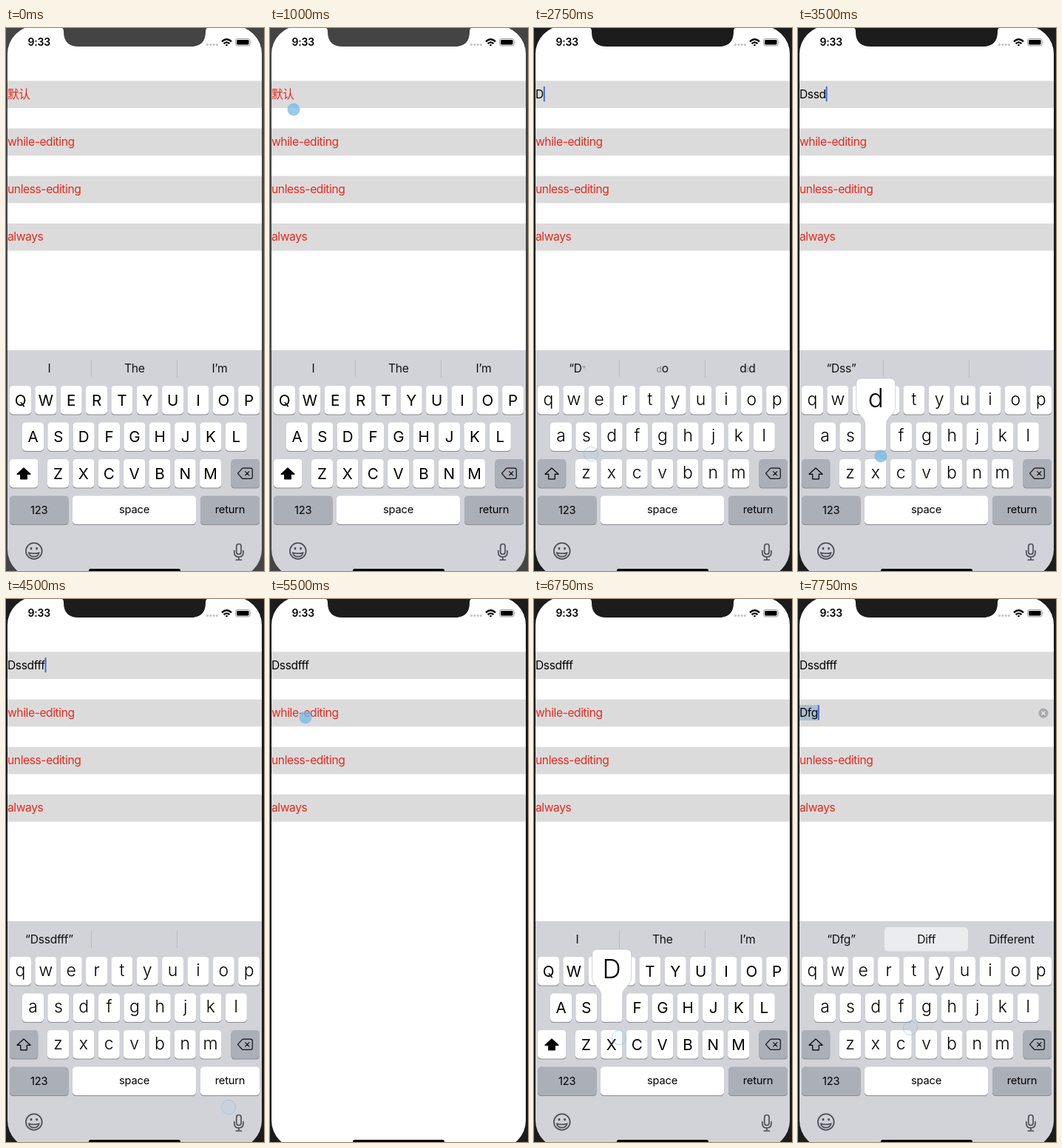
An HTML page that plays this animation: 349x733 px, repeating every 8 s.

```html
<!DOCTYPE html>
<html lang="en">
<head>
<meta charset="utf-8">
<title>Text field clear button modes</title>
<style>
html, body { margin: 0; width: 100%; height: 100%; overflow: hidden; background: #fff; }
svg { display: block; }
text { font-family: Inter, "Noto Sans CJK SC", "Noto Sans CJK", sans-serif; font-size: 15.6px; fill: #000; }
.mid { text-anchor: middle; }
.field { letter-spacing: -.4px; }
.hint { fill: #e8291c; }
.pred { letter-spacing: -.25px; fill: #111; }
.faint { font-size: 12px; fill: #85878c; }
.upper { font-size: 20.6px; }
.lower { font-size: 23px; font-weight: 300; }
.big { font-size: 35px; font-weight: 300; }
.label { font-size: 14.7px; letter-spacing: -.2px; }
.clock { font-size: 14px; font-weight: 600; letter-spacing: -.2px; }
.line { fill: none; stroke: #4d4f57; stroke-width: 1.7; stroke-linecap: round; stroke-linejoin: round; }
</style>
</head>
<body>
<svg width="349" height="733" viewBox="0 0 349 733">
  <rect width="349" height="733" fill="#fff"/>
  <text id="ruler" class="field" visibility="hidden"></text>
  <g id="fields"></g>
  <g id="board"></g>
  <g id="touch"></g>
  <rect x="112" y="730" width="124" height="5" rx="2.5"/>
  <path id="frame" fill-rule="evenodd" d="M0 0H349V733H0Z
    M2 35V704A38 38 0 0 0 40 742H308A38 38 0 0 0 346 704V35A38 38 0 0 0 308 -3H40A38 38 0 0 0 2 35Z"/>
  <path id="notch" d="M74 -1Q78 0 78 4V5Q78 25 98 25H250Q270 25 270 5V4Q270 0 274 -1Z"/>
  <text class="clock" x="29.5" y="24">9:33</text>
  <g id="dots" fill="#c2c2c5"></g>
  <g fill="none" stroke="#000" stroke-width="2.3">
    <path d="M292 18.4Q298.5 12.2 305 18.4M294.6 21.2Q298.5 17.6 302.4 21.2"/>
    <path d="M296.6 22.8Q298.5 21 300.4 22.8L298.5 24.6Z" fill="#000" stroke="none"/>
  </g>
  <rect x="310.5" y="14.5" width="19.5" height="9.4" rx="2.6" fill="none" stroke="#98989b"/>
  <rect x="312" y="16" width="16.5" height="6.4" rx="1.3"/>
  <path d="M331.2 17.5Q333 19.2 331.2 21Z" fill="#98989b"/>
</svg>
<script>
const STEP = 250, LOOP = 8000, PITCH = 34.35;
const ROWS = [["qwertyuiop", 5, 483], ["asdfghjkl", 22, 532.5], ["zxcvbnm", 56, 582]];
const HINTS = ["默认", "while-editing", "unless-editing", "always"];
const IDLE = ["I", "The", "I’m"];
const $ = id => document.getElementById(id);

// Each row changes the state from its time on; touch, pop and ret last one row.
// touch: x, y, pressed. A "~" marks a letter that is still fading.
const SCRIPT = [
  [0, { frame: "#444", caps: 1, drop: 0, focus: 0, caret: 0, one: "", two: "", pred: IDLE, mark: 0 }],
  [250, { caret: 1 }],
  [500, { touch: [32, 110, 0] }],
  [750, { touch: [32, 110, 1] }],
  [1000, { caret: 0, touch: [32, 110, 1] }],
  [1250, { caret: 1, touch: [32, 110, 1] }],
  [1500, { frame: "#1c1c1c", touch: [32, 113, 0] }],
  [1750, { caret: 0 }],
  [2000, { caret: 1, touch: [112, 580, 0] }],
  [2250, { pop: "d", touch: [112, 580, 1] }],
  [2500, { one: "D", caps: 0 }],
  [2750, { pred: ["“D~”", "~do", "d~id"], touch: [77, 575, 0] }],
  [3000, { one: "Ds", pop: "s", touch: [77, 575, 1] }],
  [3250, { one: "Dss", pred: ["“Ds”", "Da", "Did"], touch: [77, 575, 0] }],
  [3500, { one: "Dssd", pop: "d", pred: ["“Dss”", "", ""], touch: [112, 578, 1] }],
  [3750, { one: "Dssdf", pop: "f", pred: ["“Dssd”", "", ""], touch: [146, 578, 1] }],
  [4000, { one: "Dssdff", pop: "f", pred: ["“Dssdf”", "", ""], touch: [146, 578, 1] }],
  [4250, { one: "Dssdfff", pred: ["“Dssdff~f~”", "", ""] }],
  [4500, { pred: ["“Dssdfff”", "", ""], ret: 1, touch: [301, 686, 0] }],
  [4750, { caret: 0, drop: 150, touch: [301, 686, 1] }],
  [5000, { drop: 310 }],
  [5250, { touch: [48, 160, 0] }],
  [5500, { touch: [48, 160, 1] }],
  [5750, { focus: 1, caret: 1, caps: 1, pred: IDLE, drop: 120, touch: [48, 160, 1] }],
  [6000, { drop: 0, touch: [48, 160, 0] }],
  [6250, { caret: 0 }],
  [6500, { caret: 1 }],
  [6750, { caret: 0, pop: "d", touch: [115, 592, 0] }],
  [7000, { caret: 1, two: "D", caps: 0, touch: [115, 592, 1] }],
  [7250, { two: "Df", pop: "f", pred: ["“D”", "Do", "Did"], touch: [150, 580, 1] }],
  [7500, { two: "Dfg", mark: 1, pred: ["“Df~g~”", "Di~f~f", "Dif~f~e~r~e~n~t"], touch: [152, 579, 0] }],
  [7750, { pred: ["“Dfg”", "Diff", "Different"], touch: [152, 579, 0] }]
];

const rect = (x, y, w, h, fill, r = 0) =>
  `<rect x="${x}" y="${y}" width="${w}" height="${h}" rx="${r}" fill="${fill}"/>`;
const text = (x, y, cls, str) => `<text x="${x}" y="${y}" class="${cls}">${str}</text>`;
const key = (x, y, w, fill = "#fff") =>
  rect(x, y + 1.1, w, 38.4, "#898b91", 4.6) + rect(x, y, w, 38.4, fill, 4.6);

function widthOf(str) {
  $("ruler").textContent = str;
  return str ? $("ruler").getComputedTextLength() : 0;
}

function drawFields(s) {
  return HINTS.map((hint, i) => {
    const y = 71.3 + 64.2 * i, value = [s.one, s.two][i] || "", w = widthOf(value);
    let out = rect(2, y, 344, 36.7, "#dcdbdc");
    if (i === 1 && s.mark) out += rect(2, y + 7.5, w, 21, "#abbdd0");
    out += text(2, y + 23.3, value ? "field" : "field hint", value || hint);
    if (i === s.focus && s.caret) out += rect(2 + w, y + 7.5, 1.9, 20.5, "#3f65d4", 0.9);
    if (i === 1 && value) {
      out += `<circle cx="332" cy="${y + 18.6}" r="6.5" fill="#a8a8ac"/>
        <path d="M329.6 ${y + 16.2}l4.8 4.8m0 -4.8l-4.8 4.8" stroke="#f0f0f0" stroke-width="1.3"/>`;
    }
    return out;
  }).join("");
}

function drawPredictions(s) {
  const bar = s.mark
    ? rect(117, 443, 113, 32.5, "#ebecef", 5)
    : rect(115, 448, 1, 23, "#b9bbc2") + rect(231, 448, 1, 23, "#b9bbc2");
  return bar + s.pred.map((str, i) => text([58.5, 173.7, 289][i], 465, "mid pred",
    str.replace(/~(.)/g, '<tspan class="faint">$1</tspan>'))).join("");
}

function drawPopup(cx, top, char) {
  return `<path transform="translate(${cx} ${top})" fill="#fff" stroke="#b4b6bc" stroke-width=".6"
    d="M-26.5 -52.5Q-26.5 -59.5 -19.5 -59.5H19.5Q26.5 -59.5 26.5 -52.5V-22
      C26.5 -10 14.5 -9 14.5 3V34Q14.5 38.5 10 38.5H-10Q-14.5 38.5 -14.5 34V3
      C-14.5 -9 -26.5 -10 -26.5 -22Z"/>` + text(cx, top - 21, "mid big", char);
}

function drawKeys(s) {
  const gray = "#abafb8";
  let out = "", popup = "";
  for (const [chars, left, y] of ROWS) {
    [...chars].forEach((c, i) => {
      const x = left + i * PITCH, char = s.caps ? c.toUpperCase() : c;
      out += key(x, y, 29) + text(x + 14.5, y + (s.caps ? 26.8 : 25.6), s.caps ? "mid upper" : "mid lower", char);
      if (s.pop === c) popup = drawPopup(x + 14.5, y, char);
    });
  }
  out += key(5, 582, 38.3, s.caps ? "#fff" : gray) + key(304.5, 582, 38.5, gray)
    + key(5, 631.5, 79.5, gray) + key(90, 631.5, 167, "#fff") + key(263, 631.5, 80, s.ret ? "#fff" : gray)
    + text(44.7, 656, "mid label", "123") + text(173.5, 655, "mid label", "space")
    + text(303, 655, "mid label", "return");
  out += `<path d="M24 594L33 602.3H28.3V608.8H19.7V602.3H15Z" fill="${s.caps ? "#000" : "none"}"
      stroke="#000" stroke-width="1.2" stroke-linejoin="round"/>
    <path d="M313.5 601.3L319.5 594.6Q320 594.2 321 594.2H331Q333.3 594.2 333.3 596.5V606Q333.3 608.4 331 608.4H321
      Q320 608.4 319.5 608Z M323.3 598.3l6 6m0 -6l-6 6" fill="none" stroke="#111" stroke-width="1.2" stroke-linejoin="round"/>`;
  return out + popup;
}

const ICONS = `<g class="line"><circle cx="37.8" cy="706" r="10.9"/>
    <path d="M30.8 708.2Q37.8 710.5 44.8 708.2Q43.5 713.6 37.8 713.6Q32 713.6 30.8 708.2Z"/>
    <rect x="311.7" y="696.5" width="6.4" height="14" rx="3.2"/>
    <path d="M308.8 705.5V708Q308.8 714 314.9 714Q321 714 321 708V705.5M314.9 714V718M311.2 718H318.6"/></g>
  <g fill="#4d4f57"><ellipse cx="34" cy="702.6" rx="1.4" ry="1.9"/><ellipse cx="41.6" cy="702.6" rx="1.4" ry="1.9"/></g>`;

function drawTouch(t) {
  if (!t) return "";
  const [x, y, down] = t;
  return down
    ? `<circle cx="${x}" cy="${y}" r="8.5" fill="#72b9e4" fill-opacity=".75"/>`
    : `<circle cx="${x}" cy="${y}" r="9.7" fill="#8cc4e6" fill-opacity=".08" stroke="#79b6da" stroke-opacity=".45"/>`;
}

function render(s) {
  $("frame").setAttribute("fill", s.frame);
  $("notch").setAttribute("fill", s.frame);
  $("fields").innerHTML = drawFields(s);
  $("board").setAttribute("transform", `translate(0 ${s.drop})`);
  $("board").innerHTML = rect(2, 435, 344, 310, "#d1d3d9") + drawPredictions(s) + drawKeys(s) + ICONS;
  $("touch").innerHTML = drawTouch(s.touch);
}

let last = {};
const STATES = SCRIPT.map(([, change]) => (last = { ...last, touch: null, pop: "", ret: 0, ...change }));

$("dots").innerHTML = [272.5, 276.8, 281.1, 285.4].map(x => `<circle cx="${x}" cy="22.4" r="1.5"/>`).join("");

let shown = -1, start;
function tick(now) {
  start ??= now;
  const i = Math.floor(((now - start) % LOOP) / STEP);
  if (i !== shown) render(STATES[shown = i]);
  requestAnimationFrame(tick);
}
render(STATES[0]);
requestAnimationFrame(tick);
</script>
</body>
</html>
```
